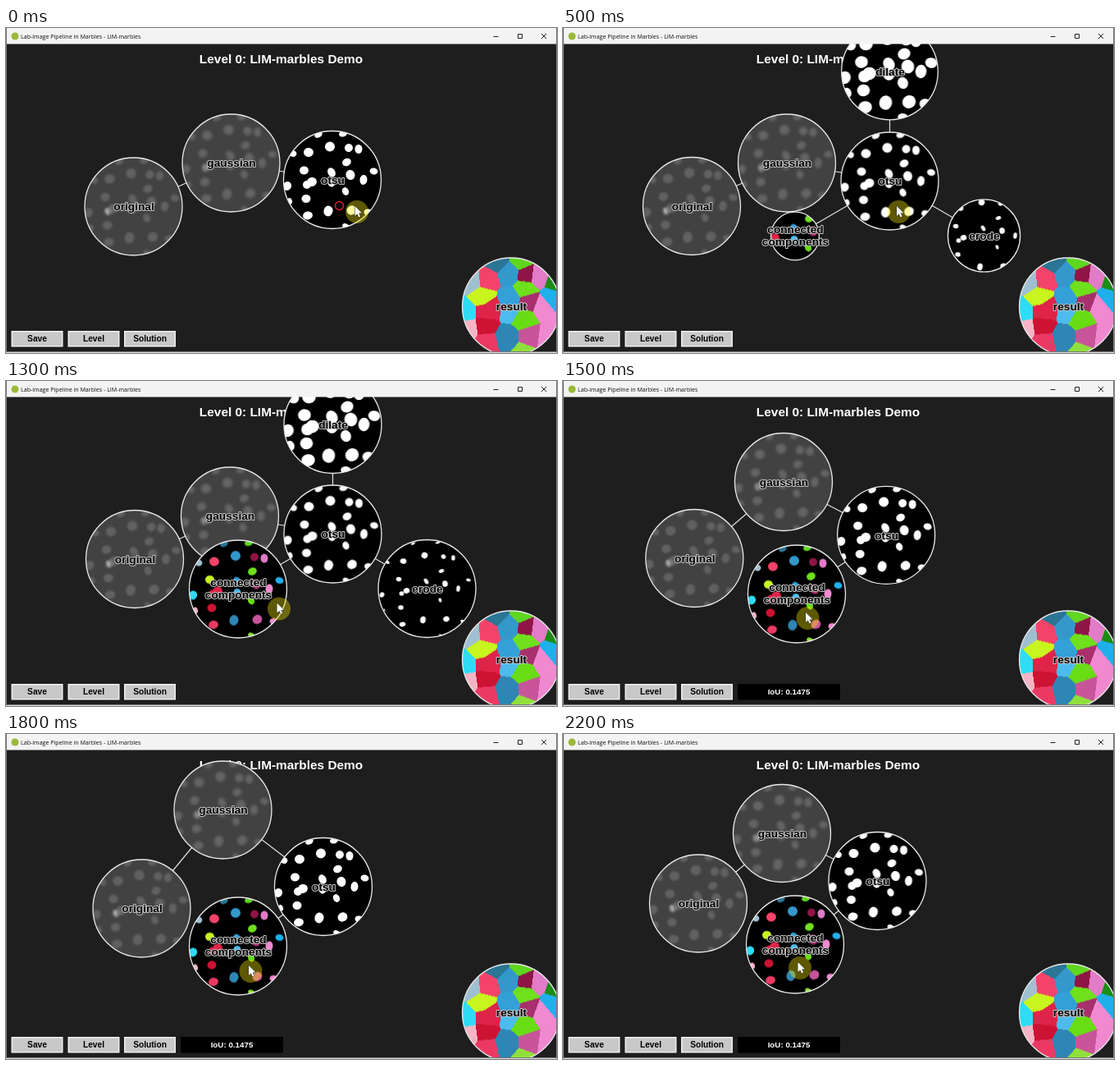
An HTML page with a canvas for the animation above (2.3 s loop, 672 px wide and 396 px high).

```html
<!DOCTYPE html>
<html lang="en">
<head>
<meta charset="utf-8">
<title>Marbles</title>
<style>
html, body { margin: 0; width: 100%; height: 100%; overflow: hidden; background: #1e1e1e; }
canvas { display: block; }
</style>
</head>
<body>
<canvas id="stage" width="672" height="396"></canvas>
<script>
const ctx = document.getElementById('stage').getContext('2d');
const R = 59.5, LOOP = 2300, STEP = 100;
const BOLD = '"Liberation Sans", Arial, sans-serif';

// cells: x, y, half width, half height, label colour
const cells = [
  [-17, -55, 5, 3.5, '#2b7595'], [13, -56, 5, 3.5, '#5fd620'],
  [-29, -33.5, 6, 5.5, '#f4436b'], [-3, -40.5, 6, 6, '#3498cb'],
  [20, -39, 5, 5, '#8f1546'], [32, -37.5, 4.5, 5.5, '#e27bc8'],
  [-48, -32, 4.5, 4, '#9fc0d0'], [17.5, -21.5, 5.5, 4.5, '#6fe01c'],
  [-34.5, -11.5, 5.5, 5, '#c8f51e'], [50.5, -10.5, 5, 4, '#1fb0ec'],
  [-1, -9, 4.5, 6, '#33a0d8'], [22, -6, 5.5, 6, '#a8306c'],
  [38, 0, 4.5, 6, '#f089d0'], [-55, 7.5, 5, 5.5, '#2fdcf5'],
  [-25, 2.5, 6, 5.5, '#de2448'], [-31, 6, 5, 5, '#de2448'],
  [-1, 4, 4.5, 4.5, '#4cbcec'], [16, 14, 4, 5, '#68dd14'],
  [-32, 23, 5.5, 5, '#cc1333'], [-5, 38, 5.5, 6.5, '#2e86b4'],
  [23.5, 37, 6, 5.5, '#c8549a'], [-30, 43.5, 6, 5, '#ea3a64'],
  [43.5, 39.5, 5, 4, '#f088d0'], [16.5, 56.5, 4.5, 3, '#90e03c'],
  [-52, 26, 3, 4, '#f8b4c4'], [56, -29, 0, 0, '#1c8c14']
];

function picture(bg, paint) {
  const c = document.createElement('canvas');
  c.width = c.height = 120;
  const g = c.getContext('2d');
  g.fillStyle = bg;
  g.fillRect(0, 0, 120, 120);
  g.translate(60, 60);
  paint(g);
  return c;
}

function blobs(g, grow, fill) {
  cells.forEach(([x, y, rx, ry, colour], i) => {
    if (!rx) return;
    g.fillStyle = fill || colour;
    g.beginPath();
    g.ellipse(x, y, Math.max(.5, rx + grow), Math.max(.5, ry + grow), i * 1.3 % 1 - .5, 0, 7);
    g.fill();
  });
}

function grey(blur, alpha, spot) {
  return picture('#424242', g => {
    g.filter = `blur(${blur}px)`;
    blobs(g, .3, `rgba(255,255,255,${alpha})`);
    g.fillStyle = `rgba(255,255,255,${spot})`;
    g.beginPath();
    g.ellipse(-32, 6, 2, 4, -.3, 0, 7);
    g.fill();
  });
}

// every point takes the colour of its nearest cell
function regions(g) {
  for (let y = -60; y < 60; y++) for (let x = -60; x < 60; x++) {
    let best = 1e9;
    for (const [cx, cy, , , colour] of cells) {
      const d = (x + .5 - cx) ** 2 + (y + .5 - cy) ** 2;
      if (d < best) { best = d; g.fillStyle = colour; }
    }
    g.fillRect(x, y, 1, 1);
  }
}

const art = {
  original: grey(.9, .17, .5),
  gaussian: grey(1.6, .18, .3),
  otsu: picture('#000', g => blobs(g, 0, '#fff')),
  dilate: picture('#000', g => blobs(g, 2.3, '#fff')),
  erode: picture('#000', g => blobs(g, -2.2, '#fff')),
  components: picture('#000', g => blobs(g, 0)),
  result: picture('#000', regions)
};

// time, x, y
const paths = {
  original: [[0, 155.5, 217.5], [500, 157, 217], [1300, 157, 217], [1600, 162, 215.5],
    [1800, 165.5, 212.5], [1900, 165.5, 212.5], [2200, 165, 206.5]],
  gaussian: [[0, 274.5, 164.5], [500, 273, 164.5], [1300, 273, 164.5], [1400, 271, 149],
    [1500, 269, 123], [1600, 266.5, 102], [1700, 265, 95], [1800, 264.5, 92.5],
    [1900, 264.5, 92.5], [2200, 267, 121]],
  otsu: [[0, 398, 185], [500, 398.5, 186.5], [1300, 398.5, 186.5], [1600, 392, 188.5],
    [1800, 387, 186], [1900, 387, 186], [2200, 383.5, 179]],
  components: [[0, 283, 253.5], [1300, 283, 253.5], [1600, 286, 262.5],
    [1800, 283, 258.5], [1900, 283, 258.5], [2200, 283, 256.5]],
  dilate: [[0, 398.5, 53]],
  erode: [[0, 513.5, 253]],
  result: [[0, 616, 339.5]],
  cursor: [[0, 425.5, 217], [200, 407, 217], [1200, 407, 217], [1300, 330.5, 270.5],
    [1400, 305, 280], [1500, 296, 282], [1900, 296, 282], [2200, 286.5, 278]]
};

function at(name, t) {
  const path = paths[name];
  const i = path.findIndex(k => k[0] > t);
  if (i < 0) return path[path.length - 1].slice(1);
  const [t0, x0, y0] = path[i - 1], [t1, x1, y1] = path[i];
  const u = (t - t0) / (t1 - t0);
  return [x0 + (x1 - x0) * u, y0 + (y1 - y0) * u];
}

const grown = (t, start) => Math.max(0, Math.min(R, (t - start) * .147));

function text(s, x, y, size, colour, outline) {
  ctx.font = `bold ${size}px ${BOLD}`;
  ctx.textAlign = 'center';
  ctx.textBaseline = 'alphabetic';
  y += size * .35;
  if (outline) {
    ctx.strokeStyle = '#c4c4c4';
    ctx.lineWidth = 2;
    ctx.lineJoin = 'round';
    ctx.strokeText(s, x, y);
  }
  ctx.fillStyle = colour;
  ctx.fillText(s, x, y);
}

function box(x, y, w, h, colour) {
  ctx.fillStyle = colour;
  ctx.fillRect(x, y, w, h);
}

function disc(x, y, r, colour) {
  ctx.fillStyle = colour;
  ctx.beginPath();
  ctx.arc(x, y, r, 0, 7);
  ctx.fill();
}

function line(colour, width, ...points) {
  ctx.strokeStyle = colour;
  ctx.lineWidth = width;
  ctx.beginPath();
  for (const [x, y] of points) ctx.lineTo(x, y);
  ctx.stroke();
}

function bubble(name, [x, y], r) {
  if (r <= 0) return;
  ctx.save();
  ctx.beginPath();
  ctx.arc(x, y, r, 0, 7);
  ctx.clip();
  ctx.drawImage(art[name], x - 60, y - 60);
  ctx.restore();
  ctx.strokeStyle = '#e8e8e8';
  ctx.lineWidth = 1.3;
  ctx.beginPath();
  ctx.arc(x, y, r, 0, 7);
  ctx.stroke();
  const two = name === 'components';
  if (two) text('connected', x + .5, y - 8, 13.7, '#000', true);
  text(name, x + .5, y + (two ? 7 : 0), 13.7, '#000', true);
}

function button(s, x) {
  box(x, 369, 63, 19.5, '#f0f0f0');
  box(x + 1.5, 370.5, 60, 16.5, '#c8c8c8');
  text(s, x + 31.5, 378.5, 10.2, '#000');
}

function titleBar() {
  box(0, 0, 672, 19.5, '#f3f3f3');
  disc(11, 10, 4.5, '#9bb83a');
  ctx.font = '7.1px "Open Sans", "Noto Sans", sans-serif';
  ctx.textAlign = 'left';
  ctx.fillStyle = '#111';
  ctx.fillText('Lab-image Pipeline in Marbles - LIM-marbles', 18, 12.5);
  line('#222', 1, [594.5, 10.5], [600.5, 10.5]);
  ctx.strokeRect(624.5, 7.5, 5, 5);
  line('#222', 1, [653, 7], [659, 13]);
  line('#222', 1, [659, 7], [653, 13]);
}

function cursor([x, y]) {
  disc(x + 2.5, y + 7, 14, 'rgba(255,240,0,.37)');
  const shape = new Path2D('M0 0V12L2.8 9.4L4.6 13.4L6.6 12.5L4.8 8.6H8.5Z');
  ctx.save();
  ctx.translate(x, y);
  ctx.strokeStyle = '#222';
  ctx.lineWidth = 1;
  ctx.stroke(shape);
  ctx.fillStyle = '#fff';
  ctx.fill(shape);
  ctx.restore();
}

function draw(t) {
  const chosen = t >= 1400;
  const size = {
    original: R, gaussian: R, otsu: R,
    dilate: chosen ? 0 : grown(t, 100),
    erode: chosen ? 0 : grown(t, 200),
    components: grown(t, 300),
    result: R
  };
  const pos = {};
  for (const name in paths) pos[name] = at(name, t);

  box(0, 0, 672, 396, '#1e1e1e');
  text('Level 0: LIM-marbles Demo', 335.5, 38, 15.4, '#fff');
  const link = (a, b) => size[b] && line('#e0e0e0', 1.2, pos[a], pos[b]);
  link('original', 'gaussian');
  link('gaussian', 'otsu');
  for (const next of ['dilate', 'erode', 'components']) link('otsu', next);
  for (const name in size) bubble(name, pos[name], size[name]);

  button('Save', 6.5);
  button('Level', 75.5);
  button('Solution', 144);
  if (chosen) {
    box(213, 369, 125, 19.5, '#000');
    text('IoU: 0.1475', 275.5, 378.5, 9.8, '#fff');
  }
  if (t < STEP) {
    ctx.strokeStyle = '#e02030';
    ctx.lineWidth = 1.4;
    ctx.beginPath();
    ctx.arc(406.5, 216.5, 5, 0, 7);
    ctx.stroke();
  }
  titleBar();
  line('#777', 1, [.5, 0], [.5, 394.5], [671.5, 394.5], [671.5, 0]);
  box(0, 395, 672, 1, '#d8d8d8');
  cursor(pos.cursor);
}

const start = performance.now();
function frame() {
  const t = (performance.now() - start) % LOOP;
  draw(Math.floor(t / STEP) * STEP);
  requestAnimationFrame(frame);
}
frame();
</script>
</body>
</html>
```
